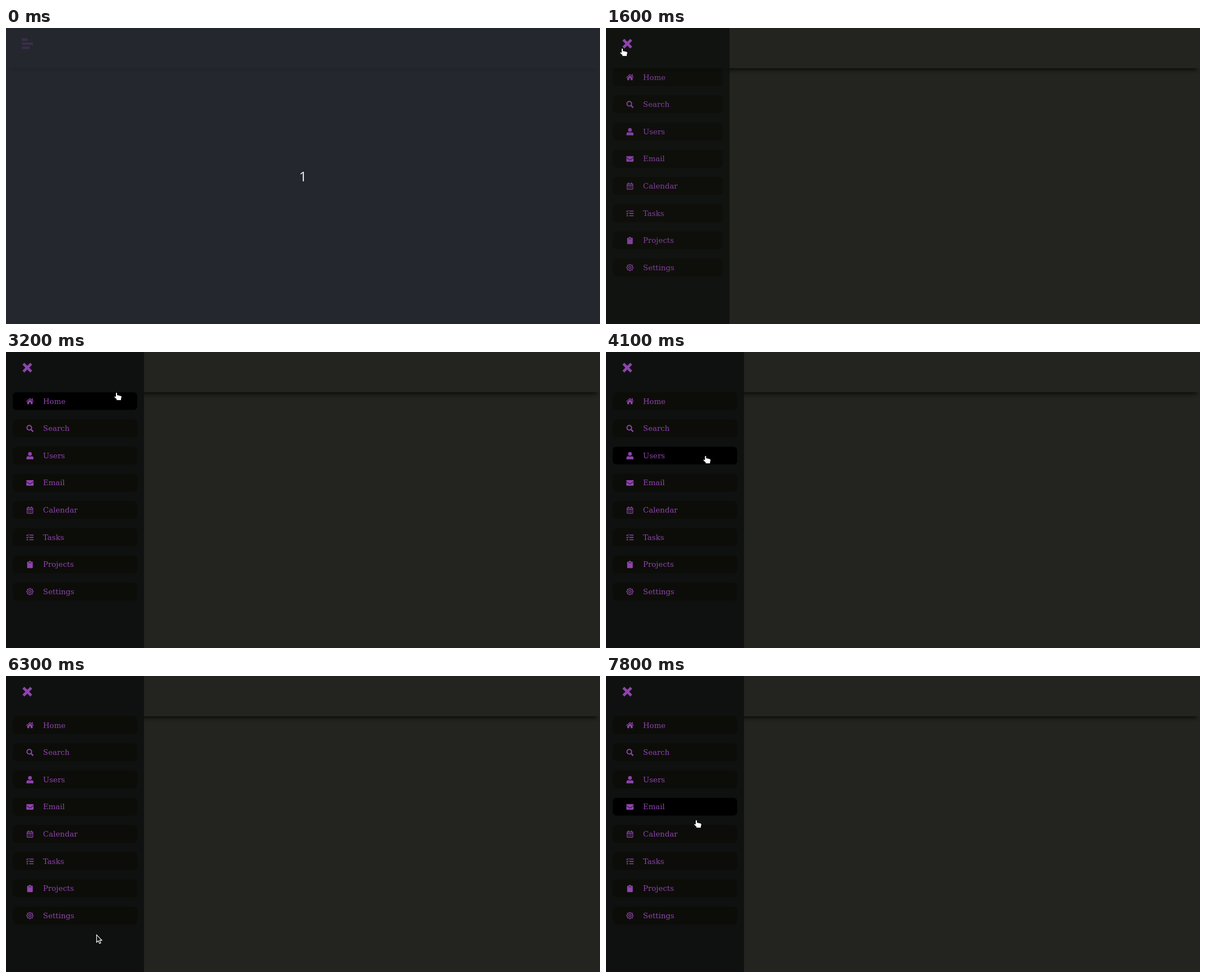
Recreate the animation shown at these times as an HTML page. Size 1059 px wide and 529 px high, loop 8 s.

```html
<!DOCTYPE html>
<html lang="en">
<head>
<meta charset="utf-8">
<title>Sidebar menu</title>
<style>
html, body { margin: 0; width: 100%; height: 100%; overflow: hidden; background: #23241f; }
#stage { display: block; width: 100vw; height: 100vh; }
.label { font: 13.333px "DejaVu Serif", serif; }
.count { font: 24.5px "Open Sans", "Noto Sans", sans-serif; }
.line { fill: none; stroke: #8e44ad; }
</style>
</head>
<body>
<svg id="stage" viewBox="0 0 1059 529">
  <defs><filter id="soft" x="-5%" y="-50%" width="110%" height="200%"><feGaussianBlur stdDeviation="4.5"/></filter></defs>
  <rect width="1059" height="529" fill="#23241f"/>
  <rect x="6" width="1047" height="74" opacity=".9" filter="url(#soft)"/>
  <rect width="1059" height="72" fill="#23241f"/>
  <svg id="side" height="529" overflow="hidden">
    <rect width="246" height="529" fill="#0f1110"/>
    <g id="items" fill="#8e44ad"></g>
  </svg>
  <path id="burger" fill="#8e44ad" d="M28.5 18.5h9.5v4.5h-9.5zM28.5 26h19.5v4h-19.5zM28.5 33.3h13.5v4.2h-13.5z"/>
  <path id="cross" class="line" stroke-width="4.8" d="M31 21l14 14M45 21l-14 14"/>
  <path id="hand" fill="#fff" d="M-1 1Q-1-.2 0-.2T1 1V4.2L3 4.4 5 4.9 7.2 5.4Q9 5.8 9 7.4L8 10.8V13H.3V11.3L-3.6 7.8Q-4 6.6-2.8 6.6L-1 7.6z"/>
  <path id="arrow" fill="#111" stroke="#fff" stroke-width="1.1" d="M.5.5V14L3.6 11.2 5.7 16 8 15 5.9 10.4H10z"/>
  <g id="cover">
    <rect width="1059" height="529" fill="#262934" opacity=".8"/>
    <text class="count" x="529.5" y="273.5" fill="#eee" text-anchor="middle">1</text>
  </g>
</svg>
<script>
const $ = id => document.getElementById(id);
const LOOP = 8000, TICK = 100, WIDTH = 246;
const TOP = 72, STEP = 48.62, HEIGHT = 31.6;

// Icons are drawn around their own centre.
const menu = [
  ['Home', '<path d="M0-5.5L7 .4 6.2 1.3 0-3.7-6.2 1.3-7 .4zM3.3-5H5V-1.5L3.3-3zM0-2.7L4.8 1.2V5.5H1.3V2H-1.3V5.5H-4.8V1.2z"/>'],
  ['Search', '<circle class="line" cx="-1.2" cy="-1" r="4.1" stroke-width="2"/><path class="line" stroke-width="2.4" d="M2 2.2L5.8 6"/>'],
  ['Users', '<circle cy="-2.9" r="3.3"/><path d="M-6.3 6.7V4.6Q-6.3 1.2-2.8 1.2Q0 2.4 2.8 1.2Q6.3 1.2 6.3 4.6V6.7z"/>'],
  ['Email', '<rect x="-6.5" y="-4.6" width="13" height="10" rx="1.2"/><path fill="none" stroke="#0c0d08" d="M-6.5-2.2L-1.5 1.5Q0 2.5 1.5 1.5L6.5-2.2"/>'],
  ['Calendar', '<rect class="line" x="-5.1" y="-4" width="10.2" height="10" rx=".8" stroke-width="1.2"/><path class="line" stroke-width="1.3" d="M-2.7-6.2V-3.5M2.7-6.2V-3.5M-5-1.3H5"/><path class="line" stroke-width="1.4" stroke-dasharray="1.4 1" d="M-3.2 1.2H3.4M-3.2 3.6H3.4"/>'],
  ['Tasks', '<path class="line" stroke-width="1.3" d="M-6.4-3.8l1.3 1.3 2.4-2.7M-6.4.4l1.3 1.3 2.4-2.7"/><circle cx="-4.7" cy="4.6" r="1.2"/><path class="line" stroke-width="1.6" d="M-1.2-3.6H6.5M-1.2.5H6.5M-1.2 4.6H6.5"/>'],
  ['Projects', '<path d="M-4-4.7H-1.7Q-1.5-6.4 0-6.4T1.7-4.7H4Q5-4.7 5-3.7V5.7Q5 6.7 4 6.7H-4Q-5 6.7-5 5.7V-3.7Q-5-4.7-4-4.7z"/><path stroke="#0c0d08" stroke-width=".8" d="M-2.5-2.7H2.5"/>'],
  ['Settings', `<path class="line" stroke-width="1.2" stroke-linejoin="round" d="${gear()}"/><circle class="line" r="2" stroke-width="1.2"/>`]
];

function gear() {
  const pts = [];
  for (let i = 0; i < 32; i++) {
    const a = (i - .5) * Math.PI / 16, r = i % 4 < 2 ? 5.9 : 4.4;
    pts.push((r * Math.cos(a)).toFixed(2) + ' ' + (r * Math.sin(a)).toFixed(2));
  }
  return 'M' + pts.join('L') + 'z';
}

$('items').innerHTML = menu.map(([name, icon], i) => {
  const y = TOP + STEP * i;
  return `<rect class="row" x="12" y="${y}" height="${HEIGHT}" rx="6.5"/>
    <g transform="translate(42.7 ${y + 15.8})">${icon}</g>
    <text class="label" x="66" y="${y + 20.6}">${name}</text>`;
}).join('');
const rows = [...document.querySelectorAll('.row')];

// Pointer stops: time, x, y
const stops = [
  [700, 35, 31], [900, 29, 37], [2200, 29, 37], [3100, 186, 73], [3200, 197, 73],
  [3300, 197, 73], [4200, 175, 200], [5000, 158, 328], [5100, 157, 335], [5400, 156, 375],
  [5500, 156, 375], [5900, 155, 423], [6000, 155, 423], [6300, 161, 462], [6500, 162, 466],
  [6800, 162, 466], [7500, 164, 326], [7600, 164, 326], [7700, 163, 284], [7800, 161, 258],
  [7900, 160, 244]
];

function pointer(t) {
  const n = stops.findIndex(s => s[0] >= t);
  if (n < 1) return stops[n ? stops.length - 1 : 0].slice(1);
  const [t0, x0, y0] = stops[n - 1], [t1, x1, y1] = stops[n];
  const k = (t - t0) / (t1 - t0);
  return [x0 + (x1 - x0) * k, y0 + (y1 - y0) * k];
}

// cubic-bezier(.25, .1, .25, 1)
function ease(x) {
  if (x <= 0) return 0;
  if (x >= 1) return 1;
  let lo = 0, hi = 1, s;
  for (let i = 0; i < 20; i++) {
    s = (lo + hi) / 2;
    const bx = .75 * s * (1 - s) + s ** 3;
    if (bx < x) lo = s; else hi = s;
  }
  return .3 * s * (1 - s) ** 2 + 3 * s * s * (1 - s) + s ** 3;
}

const show = (id, on) => $(id).setAttribute('display', on ? 'inline' : 'none');

function draw(time) {
  const t = Math.floor(time % LOOP / TICK) * TICK;
  const started = t >= 500, opened = t >= 1400;
  const p = opened ? ease((t - 1292) / 500) : 0;
  const w = WIDTH * p;

  $('side').setAttribute('width', w);
  $('side').setAttribute('opacity', p);
  show('side', opened);
  show('burger', !opened);
  show('cross', opened);
  show('cover', !started);

  // The hover state runs slightly ahead of the pointer.
  const [x, y] = pointer(Math.min(t, 7800));
  const [hx, hy] = pointer(t + TICK);
  const slot = Math.floor((hy - TOP) / STEP);
  const active = opened && hy >= TOP && (hy - TOP) % STEP <= HEIGHT ? slot : -1;
  rows.forEach((row, i) => {
    row.setAttribute('width', Math.max(0, w - 24));
    row.setAttribute('fill', i === active ? '#000' : '#0c0d08');
  });

  const link = !!rows[active] || (hx < 50 && hy < 50);
  show('hand', started && link);
  show('arrow', started && !link);
  for (const id of ['hand', 'arrow']) $(id).setAttribute('transform', `translate(${x} ${y})`);
}

const begin = performance.now();
function loop() {
  draw(performance.now() - begin);
  requestAnimationFrame(loop);
}
loop();
</script>
</body>
</html>
```
